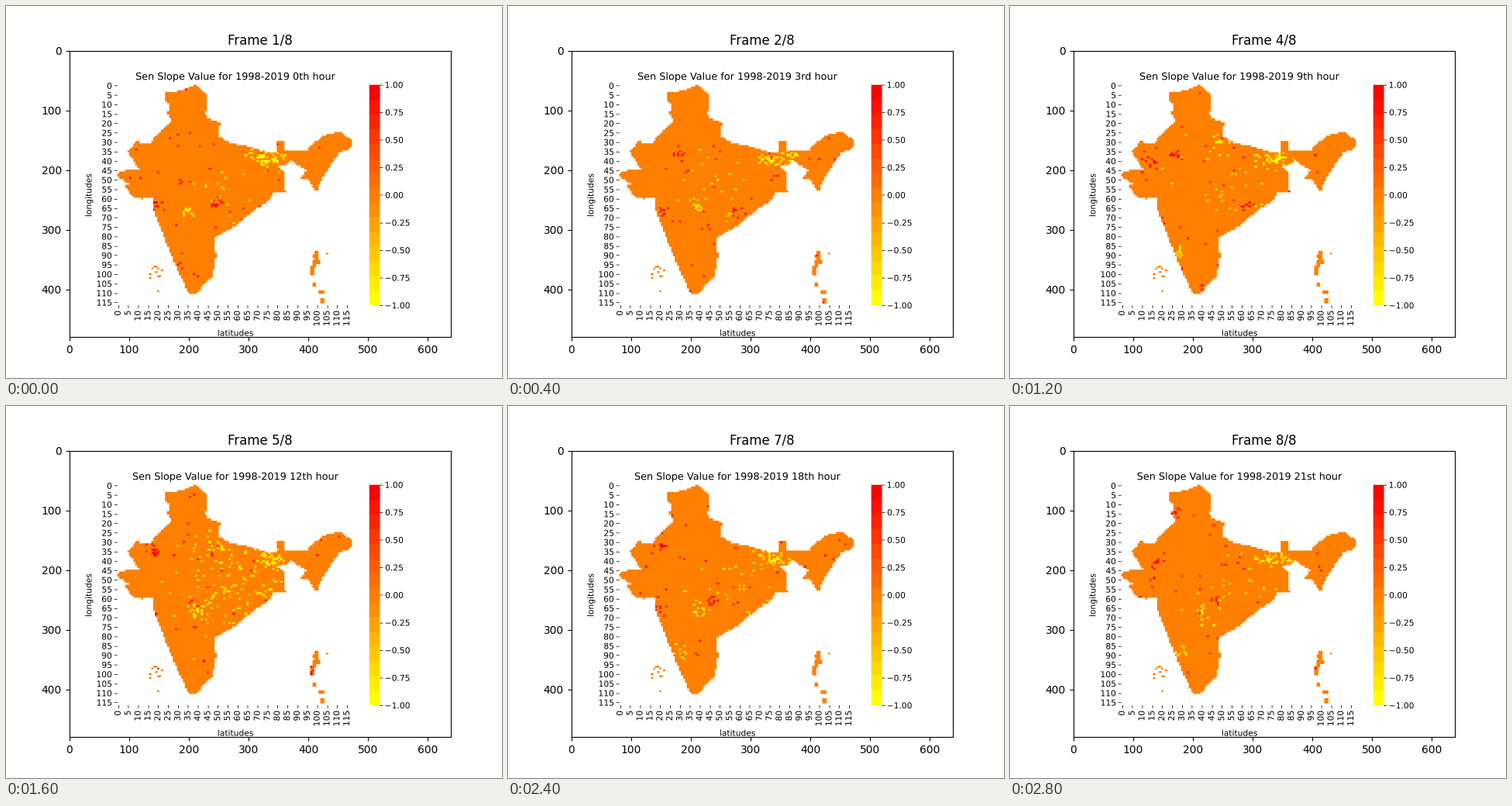
Animation, 640 px wide and 480 px high, one loop 3.2 s. Source, as a matplotlib script:

```python
import numpy as np
import matplotlib.pyplot as plt
from matplotlib.animation import FuncAnimation
from matplotlib.patches import PathPatch
from matplotlib.path import Path
from matplotlib.textpath import TextPath
from matplotlib.transforms import Affine2D

W, H, DPI = 640, 480, 100
COLS, ROWS = 119, 117
LEFT, TOP, WIDE, HIGH = 80, 57.6, 396.8, 369.6    # heat map inside the chart picture
CW, CH = WIDE / COLS, HIGH / ROWS
PAD = 9.7                                         # from an axis to its tick labels
EM = 10 * DPI / 72
CMAP = plt.get_cmap("autumn_r", 15).copy()
CMAP.set_bad("white")

# Key points of the coast and borders, in stage pixels
mainland = [
    (243, 102), (247, 102), (250, 107), (258, 113), (260, 131), (257, 136),
    (259, 144), (279, 152), (273, 160), (276, 169), (285, 175), (312, 181),
    (335, 188), (350, 190), (350, 175), (358, 175), (361, 191), (352, 207),
    (358, 212), (361, 241), (345, 241), (339, 251), (320, 264), (295, 284),
    (270, 299), (271, 323), (267, 348), (256, 359), (246, 371), (236, 371),
    (222, 342), (212, 319), (202, 293), (190, 262), (190, 246), (176, 249),
    (165, 247), (152, 232), (161, 230), (144, 221), (144, 216), (156, 211),
    (172, 211), (157, 188), (168, 175), (186, 178), (195, 165), (214, 148),
    (208, 138), (212, 126), (204, 122), (204, 112), (228, 109)]
northeast = [
    (355, 187), (388, 187), (395, 178), (405, 171), (416, 164), (433, 163),
    (446, 173), (446, 180), (442, 186), (430, 189), (423, 200), (412, 216),
    (405, 229), (402, 237), (397, 237), (390, 224), (380, 222), (389, 211),
    (376, 206), (369, 199), (360, 206), (355, 205)]
# Column, row, width, height in cells
islands = [(99, 88, 2, 5), (98, 90, 3, 2), (100, 93, 2, 2), (98, 93, 2, 4),
           (97, 96, 2, 5), (98, 105, 2, 2), (101, 109, 3, 2), (102, 113, 2, 3)]

# Hour, red hot spots, yellow hot spots
hours = [
    ("0th", [(196, 257), (269, 254), (222, 333)], [(235, 265), (325, 192)]),
    ("3rd", [(220, 188), (293, 265), (200, 265)], [(243, 258), (366, 196)]),
    ("6th", [(217, 190), (186, 199), (200, 263)], [(255, 168), (241, 250)]),
    ("9th", [(214, 193), (180, 200), (305, 258)], [(269, 173), (217, 317)]),
    ("12th", [(192, 190), (190, 182), (396, 342)], [(272, 180), (245, 265)]),
    ("15th", [(188, 182), (215, 184), (180, 199)], [(240, 262), (212, 312)]),
    ("18th", [(198, 180), (263, 250), (196, 262)], [(245, 264), (219, 320)]),
    ("21st", [(263, 250), (190, 203), (214, 135)], [(220, 318), (247, 267)])]


def to_cell(x, y):
    """Stage pixels to fractional column and row."""
    px, py = (x - 82) * W / 493, (y - 57) * H / 370
    return (px - LEFT) / CW, (py - TOP) / CH


def make_land():
    cols, rows = np.meshgrid(np.arange(COLS) + 0.5, np.arange(ROWS) + 0.5)
    centres = np.column_stack([cols.ravel(), rows.ravel()])
    land = np.zeros((ROWS, COLS), bool)
    for outline in (mainland, northeast):
        shape = Path([to_cell(*p) for p in outline])
        land |= shape.contains_points(centres).reshape(land.shape)
    for c, r, w, h in islands:
        land[r:r + h, c:c + w] = True
    rng = np.random.default_rng(3)
    land[rng.integers(96, 103, 12), rng.integers(16, 23, 12)] = True
    land[109, 20] = land[89, 105] = True
    return land


land = make_land()


def make_grid(i):
    """Calm land with red and yellow specks; yellow peaks after midday."""
    rng = np.random.default_rng(40 + i)
    grid = np.where(land, 0.0, np.nan)

    def cloud(value, x, y, sx, sy, n):
        c, r = to_cell(rng.normal(x, sx, n), rng.normal(y, sy, n))
        c, r = c.astype(int), r.astype(int)
        keep = land[r, c]
        grid[r[keep], c[keep]] = value

    _, red, yellow = hours[i]
    midday = np.exp(-((3 * i - 13) / 2.5) ** 2)
    cloud(-1, 342, 198, 12, 5, 40)
    cloud(-1, 290, 235, 34, 30, int(25 + 140 * midday))
    for x, y in yellow:
        cloud(-1, x, y, 5, 4, 12)
    for x, y in red:
        cloud(1, x, y, 4, 3.5, 9)
    for r, c in rng.permutation(np.argwhere(land))[:30]:
        grid[r, c] = 1
    return np.ma.masked_invalid(grid)


# The chart is painted pixel by pixel and then shown scaled down
rows = ((np.arange(58, 427) + 0.5 - TOP) / CH).astype(int)
cols = ((np.arange(80, 477) + 0.5 - LEFT) / CW).astype(int)
chart = np.ones((H, W, 3))
chart[58:427, 502:520] = CMAP(np.linspace(1, 0, 369))[:, None, :3]


def paint(i):
    picture = chart.copy()
    picture[58:427, 80:477] = CMAP((make_grid(i) + 1) / 2)[np.ix_(rows, cols)][..., :3]
    return picture


def text_path(text, x, y, size=10, ha="center", turn=0):
    path = TextPath((0, 0), text, size=size * DPI / 72)
    box = path.get_extents()
    dx = {"left": box.x0, "center": (box.x0 + box.x1) / 2, "right": box.x1}[ha]
    move = Affine2D().translate(-dx, 0).rotate_deg(turn).scale(1, -1).translate(x, y - 1)
    return move.transform_path(path)


def write(*args, **kwargs):
    patch = PathPatch(text_path(*args, **kwargs), facecolor="black", linewidth=0)
    return ax.add_patch(patch)


def title_path(i):
    text = f"Sen Slope Value for 1998-2019 {hours[i][0]} hour"
    return text_path(text, LEFT + WIDE / 2, TOP - 8.3, size=12)


fig, ax = plt.subplots(figsize=(W / DPI, H / DPI), dpi=DPI)
middle = 0.38 * EM            # baseline below the centre of a digit
for k in range(0, 116, 5):
    x, y = LEFT + (k + 0.5) * CW, TOP + (k + 0.5) * CH
    chart[427:432, round(x)] = 0
    chart[round(y), 75:80] = 0
    write(str(k), x + 0.275 * EM, TOP + HIGH + PAD, ha="right", turn=90)
    write(str(k), LEFT - PAD, y + middle, ha="right")
for value in np.linspace(-1, 1, 9):
    y = TOP + HIGH * (1 - value) / 2
    chart[round(y), 520:525] = 0
    write(f"{value:.2f}".replace("-", "\u2212"), 520 + PAD, y + middle, ha="left")
write("latitudes", LEFT + WIDE / 2, 478.5)
write("longitudes", 36.8, TOP + HIGH / 2, turn=90)

pictures = [paint(i) for i in range(len(hours))]
image = ax.imshow(pictures[0])
title = ax.add_patch(PathPatch(title_path(0), facecolor="black", linewidth=0))
counter = ax.set_title("")
ax.set(xlim=(-0.5, W - 0.5), ylim=(H - 0.5, -0.5))


def draw(i):
    counter.set_text(f"Frame {i + 1}/{len(hours)}")
    title.set_path(title_path(i))
    image.set_data(pictures[i])
    return counter, title, image


anim = FuncAnimation(fig, draw, frames=len(hours), interval=400, repeat=True)
plt.show()
```
